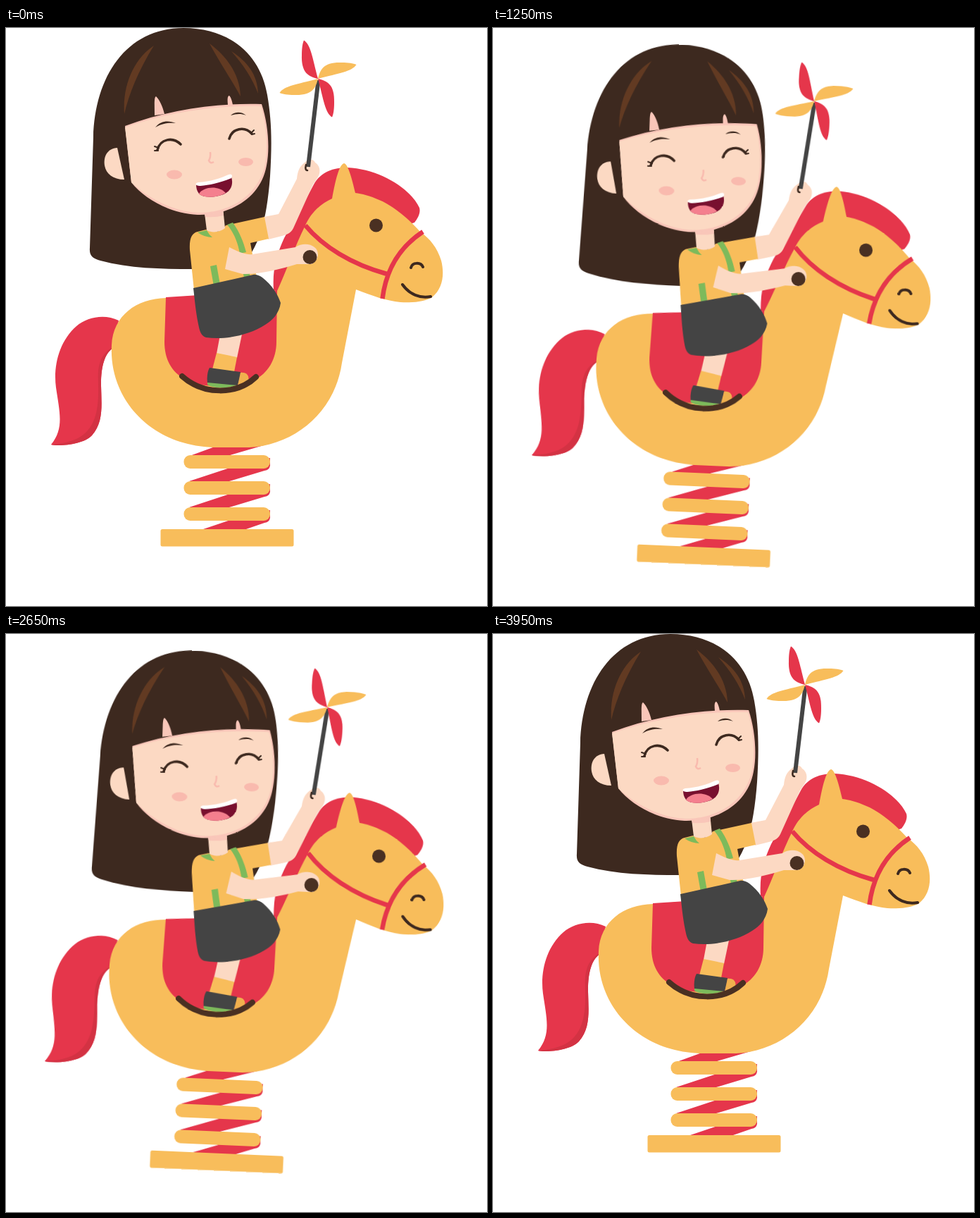
These frames come from a looping animation (683 by 820 pixels, 4000 ms). An HTML page:

```html
<!DOCTYPE html>
<html lang="en">
<head>
<meta charset="utf-8">
<title>Spring horse ride</title>
<style>
  html, body { margin: 0; width: 100%; height: 100%; overflow: hidden; background: #fff; }
  svg { display: block; width: 683px; height: 820px; }
  #ride {
    transform-origin: 341.5px 386px;
    animation: rock 4s -5ms infinite;
  }
  /* 50 ms ticks, constant speed down and back, short rest at the top */
  @keyframes rock {
    0%, 97.5%, 100% { transform: translate(0, 0) rotate(0deg); animation-timing-function: steps(39); }
    48.75% { transform: translate(-.6px, 42.4px) rotate(3.86deg); animation-timing-function: steps(39); }
  }
  .yellow { fill: #f8bd5b; }
  .red { fill: #e5364b; }
  .deep { fill: #d33243; }
  .hair { fill: #3d291f; }
  .streak { fill: #623a22; }
  .skin { fill: #fcd9c3; }
  .blush { fill: #f9baae; }
  .shade { fill: #f9c6b9; }
  .dark { fill: #444; }
  .green { fill: #7dba5b; }
  .wood { fill: #4a3022; }
  .line { fill: none; stroke: #3d291f; stroke-linecap: round; }
  .rein { fill: none; stroke: #e5364b; stroke-width: 6.5; }
</style>
</head>
<body>
<svg viewBox="0 0 683 820" xmlns="http://www.w3.org/2000/svg">
  <defs>
    <path id="coil" d="M375 610V621Q374 627 367 628L317 643H260L330 620Z"/>
    <rect id="ring" x="252.500" y="606" width="122.500" height="19" rx="9"/>
    <path id="blade" d="M0 0C-13 -3 -24 -8 -23 -34C-23 -43 -22 -50 -20 -54.500C-10 -48 -8 -30 0 0Z"/>
  </defs>
  <g id="ride">
    <!-- spring -->
    <g class="red">
      <path d="M302 592H366L315 607H261Z"/>
      <use href="#coil"/>
      <use href="#coil" y="37"/>
      <path d="M375 684V695Q374 701 367 702L338 712H277L330 694Z"/>
    </g>
    <g class="yellow">
      <use href="#ring"/>
      <use href="#ring" y="37"/>
      <use href="#ring" y="74"/>
      <rect x="219.500" y="711" width="189" height="24.500" rx="2.500"/>
    </g>

    <!-- back hair -->
    <path class="hair" d="M252 0C170 0 126 70 124 155L119 312C118 324 124 327 134 330C175 341 220 342 265 342L340 330L349 318C366 290 372 250 375 210C378 160 377 130 371 95C362 40 320 0 252 0Z"/>

    <!-- horse -->
    <path class="red" d="M160 415C140 405 115 410 100 423C75 445 67 480 71 510C76 545 83 568 64 591C75 594 110 591 122 578C140 558 135 530 135 505C135 480 140 462 152 454Z"/>
    <path class="deep" d="M152 452C132 465 130 480 131 505C132 540 128 568 102 582C90 588 75 590 64 591C75 594 110 591 122 578C140 558 135 530 135 505C135 480 140 462 152 454Z"/>
    <path class="red" d="M380 372C378 340 385 320 395 298C410 270 425 245 437 222C447 204 465 198 485 198C530 200 575 228 587 255C589 262 585 270 580 276L500 300H430L386 373Z"/>
    <path class="yellow" d="M267 380L227 383C185 384 152 408 150 450C146 530 210 595 300 595H345C410 592 467 545 477 475L497 371C520 380 540 387 560 389C580 390 595 388 605 382C620 370 623 350 618 330C612 311 602 299 588 289C573 272 550 252 530 244C517 238 505 235 496 234C491 212 485 192 480 192C473 194 468 215 463 242C445 250 432 264 425 280C410 310 398 345 385 373Z"/>
    <path class="rein" d="M425 280C450 310 490 335 541 349M592 289C560 310 540 340 534.500 384"/>
    <circle class="wood" cx="525.500" cy="280" r="9.500"/>
    <path class="line" stroke-width="4" d="M575 340C577 332 589 332 592 339M563 364C573 378 588 384 603 381"/>
    <path class="red" d="M227 382L385 372L384 445C384 470 372 490 352 500C335 511 270 511 255 499C235 488 225 470 225 445Z"/>

    <!-- leg -->
    <path class="skin" d="M305 430H336L328 468L299 462Z"/>
    <path class="yellow" d="M299 461L328 467L324 488L293 484Z"/>
    <path class="green" d="M286 501L330 505C318 512 295 512 286 506Z"/>
    <path class="dark" d="M289 482L333 488C332 495 331 501 329 507L286 503C285 496 286 487 289 482Z"/>
    <path fill="#f0b04e" d="M333 489C341 488 346 493 344 500L329 507Z"/>
    <path class="line" style="stroke:#4a3022" stroke-width="8" d="M250 494C280 521 328 521 355 495"/>

    <!-- raised arm and pinwheel -->
    <path class="skin" d="M366 268L387 264L413 214C414 203 417 196 424 191C430 185 437 186 439 191C447 196 447 206 442 213L436 222L408 284C404 292 398 293 392 295L372 300Z"/>
    <path d="M443.500 74L429 197" fill="none" stroke="#444" stroke-width="6"/>
    <path class="line" stroke-width="2.500" d="M426 194Q424 202 428 202"/>
    <g transform="translate(443 72)">
      <use href="#blade" class="red"/>
      <use href="#blade" class="yellow" transform="rotate(90)"/>
      <use href="#blade" class="red" transform="rotate(180)"/>
      <use href="#blade" class="yellow" transform="rotate(270)"/>
    </g>

    <!-- body -->
    <path class="yellow" d="M284 286C296 292 306 289 312 280L367 268L373 299L347 305L356 354L267 372L261 315C260 298 264 291 272 289Z"/>
    <path class="skin" d="M281 255L285 287C292 291 304 290 311 284L308 255Z"/>
    <path class="shade" d="M281 260L283 268Q298 269 309 266L308 258Z"/>
    <path class="green" d="M272 290L285 287Q288 293 293 297Q282 297 272 290ZM314 279L322 276C332 290 337 303 341 318L332 320C329 303 323 290 314 279ZM290 338L299 336L304 364L295 366ZM336 345L345 343L347 354H338Z"/>
    <path class="skin" d="M317 311C332 319 342 322 350 321L411 311C420 305 432 306 438 311C446 317 444 330 434 335L413 335C390 342 360 350 336 349L311 342Z"/>
    <circle class="wood" cx="431.500" cy="325" r="10"/>
    <path class="dark" d="M266 369L351 350C356 349 361 352 364 354C378 365 386 378 390 390C388 405 378 415 368 421C345 436 310 443 284 439C277 437 275 430 273 420C269 400 268 385 266 369Z"/>

    <!-- face -->
    <path class="skin" d="M158 170C144 171 138 182 140 195C142 207 152 215 168 215Z"/>
    <path class="shade" d="M169 139C230 116 300 106 363 108C372 135 375 170 370 195C362 240 320 266 272 265C232 263 196 242 178 219Z"/>
    <path class="skin" d="M169 141C230 119 300 109 362 111C370 138 372 168 368 193C359 237 318 263 272 262C235 260 200 240 178 219Z"/>
    <path class="shade" d="M211 124C211 110 210 98 213 97C218 102 222 110 225 122ZM315 109C314 100 315 96 317 96C320 99 321 104 322 109Z"/>
    <path class="streak" d="M210 25C184 42 165 78 168 122C174 95 188 60 210 25ZM289 22C313 40 332 65 333 97C323 78 304 50 289 22ZM320 33C343 48 357 66 358 93C350 72 337 52 320 33Z"/>
    <path class="hair" d="M212 141C220 131 231 131 241 135C231 134 222 135 212 141ZM319 124C326 118 335 119 341 124C333 121 327 122 319 124Z"/>
    <path class="line" stroke-width="3.500" d="M215 173C219 157 237 154 248 165M317 157C321 142 339 139 349 150"/>
    <path class="line" stroke-width="2" d="M216 174L211 174M217 170L211 168M348 149L352 145M349 151L353 150"/>
    <path fill="none" stroke="#f9baae" stroke-width="2.500" d="M290 176Q291 183 288 188Q290 193 295 190"/>
    <ellipse class="blush" cx="239" cy="208" rx="11" ry="6.500"/>
    <ellipse class="blush" cx="340.500" cy="190" rx="10.500" ry="6"/>
    <path fill="#78102f" d="M270 222L320 211C323 222 320 231 309 236C296 241 279 241 274 235C271 231 270 227 270 222Z"/>
    <path fill="#f47f8e" d="M274 235C281 225 301 223 312 234C300 241 280 242 274 235Z"/>
    <path fill="#fff" d="M273 219C290 218 305 213 316 208C321 206 322 210 320 213C303 220 288 223 276 224C268 224 268 220 273 219Z"/>
  </g>
</svg>
</body>
</html>
```
